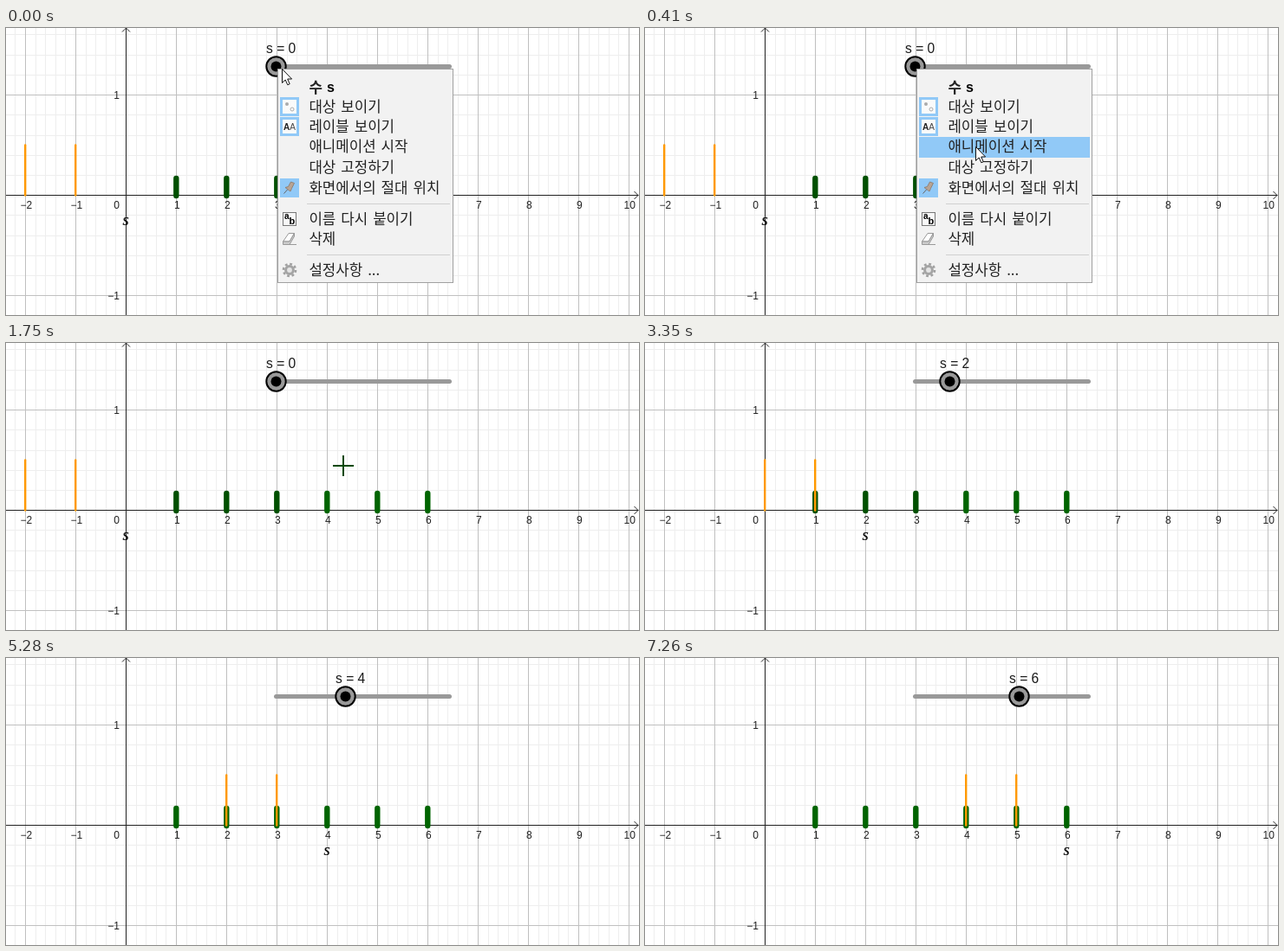
Recreate the animation shown at these times as an HTML page. Size 730 px wide and 332 px high, loop 8000 ms.

```html
<!DOCTYPE html>
<html lang="ko">
<head>
<meta charset="utf-8">
<title>Slider animation</title>
<style>
html, body { margin: 0; width: 100%; height: 100%; overflow: hidden; background: #fff; }
svg { display: block; }
text { font-family: "Liberation Sans", Arial, sans-serif; fill: #000; }
.tick { font-size: 12px; fill: #222; }
.name { font: italic 18.5px "Liberation Serif", serif; stroke: #000; stroke-width: .15; }
.value { font-size: 15.6px; fill: #1a1a1a; }
.item { font: 300 16.8px "Noto Sans CJK KR", "Noto Sans CJK", "Noto Sans KR", sans-serif; word-spacing: 1.3px; fill: #222; }
</style>
</head>
<body>
<svg id="stage" width="730" height="332" viewBox="0 0 730 332"></svg>
<script>
const NS = 'http://www.w3.org/2000/svg';
const stage = document.getElementById('stage');
const LOOP = 8000, OX = 138.5, OY = 193.6, UX = 58, UY = 116;

function add(parent, tag, attrs, text) {
  const el = document.createElementNS(NS, tag);
  for (const k in attrs) el.setAttribute(k, attrs[k]);
  if (text !== undefined) el.textContent = text;
  parent.appendChild(el);
  return el;
}
const group = (parent = stage) => add(parent, 'g', {});
const rect = (p, x, y, width, height, fill, more) => add(p, 'rect', { x, y, width, height, fill, ...more });
const path = (p, d, stroke, width = 1, more) =>
  add(p, 'path', { d, stroke, 'stroke-width': width, fill: 'none', ...more });
const label = (p, x, y, text, cls, more) => add(p, 'text', { x, y, class: cls, ...more }, text);
const move = (el, x, y) => el.setAttribute('transform', `translate(${x} ${y})`);
const show = (el, on) => el.setAttribute('visibility', on ? 'visible' : 'hidden');
const snap = v => Math.floor(v) + .5;
const xAt = k => snap(OX + UX * k);
const yAt = k => snap(OY - UY * k);
const signed = n => n < 0 ? '\u2212' + -n : n;

// Grid and axes
function drawGrid() {
  const grid = group();
  for (const major of [false, true]) {
    let d = '';
    for (let i = -12; i <= 50; i++)
      if ((i % 5 === 0) === major) d += `M${xAt(i / 5)} 0V332`;
    for (let i = -6; i <= 8; i++)
      if ((i % 5 === 0) === major) d += `M0 ${yAt(i / 5)}H730`;
    path(grid, d, major ? '#c0c0c0' : '#eee');
  }
  path(grid, `M0 ${yAt(0)}H729M${OX} 0V332`, '#222');
  path(grid, `M724.5 189L729 ${yAt(0)}L724.5 198M134 4.5L${OX} 0L143 4.5`, '#222');
  for (let k = -2; k <= 10; k++)
    if (k) label(grid, OX + UX * k + .8, 209, signed(k), 'tick', { 'text-anchor': 'middle' });
  label(grid, 131, 209, '0', 'tick', { 'text-anchor': 'end' });
  for (const k of [1, -1])
    label(grid, 131, yAt(k) + 4.5, signed(k), 'tick', { 'text-anchor': 'end' });
}
drawGrid();

const bars = [1, 2, 3, 4, 5, 6].map(k =>
  path(stage, `M${xAt(k) - .2} 174V194`, '#006400', 6.4, { 'stroke-linecap': 'round' }));

const pair = group();
for (const k of [-2, -1])
  path(pair, `M${xAt(k) - .3} 135.5V193.5`, '#ff9900', 2.4, { 'stroke-linecap': 'round' });
const varName = label(stage, 0, 228, 's', 'name', { 'text-anchor': 'middle' });

// Slider
path(stage, 'M311.5 44.5H511.5', '#999', 5, { 'stroke-linecap': 'round' });
const knob = group();
add(knob, 'circle', { cx: 311.5, cy: 44.5, r: 11.2, fill: '#999', stroke: '#000', 'stroke-width': 2 });
add(knob, 'circle', { cx: 311.5, cy: 44.5, r: 6, fill: '#000' });
const value = label(stage, 300, 29, '', 'value');

// Context menu
const menu = group();
rect(menu, 313.5, 47.5, 202, 247, '#f2f2f2', { stroke: '#a0a0a0' });
const hover = rect(menu, 316, 126, 197, 24, '#91c9f7');

function drawMenu() {
  const rows = [
    [97, '대상 보이기'], [120, '레이블 보이기'], [143, '애니메이션 시작'],
    [167, '대상 고정하기'], [191, '화면에서의 절대 위치'],
    [227, '이름 다시 붙이기'], [250, '삭제'], [286, '설정사항 ...']
  ];
  for (const [y, text] of rows) label(menu, 349.4, y, text, 'item');
  label(menu, 349.4, 75, '수', 'item', { style: 'font-weight:bold' });
  label(menu, 370, 74, 's', '', { 'font-size': 16, 'font-weight': 'bold' });
  path(menu, 'M347 203.5H512M347 262.5H512', '#d0d0d0');

  for (const y of [80, 103]) {
    rect(menu, 316, y, 22, 22, '#91c9f7');
    rect(menu, 319, y + 3, 16, 16, '#fafafa');
  }
  add(menu, 'circle', { cx: 324, cy: 88, r: 2, fill: '#aaa' });
  add(menu, 'circle', { cx: 330, cy: 94, r: 2, fill: '#fff', stroke: '#aaa' });
  label(menu, 320, 118, 'A', '', { 'font-size': 10, 'font-weight': 'bold', style: 'fill:#222' });
  label(menu, 327.3, 118, 'A', '', { 'font-size': 10, style: 'fill:#444' });

  rect(menu, 316, 174, 22, 22, '#91c9f7');
  path(menu, 'M320.5 191.5L324.5 187', '#666');
  path(menu, 'M322 184.5L328 189L329.5 185.5L332.5 179.5L328.5 178L325.5 183.5Z', '#8a7668', .8, { fill: '#b8a494' });

  rect(menu, 319.5, 213.5, 15, 15, '#f8f8f8', { stroke: '#777' });
  label(menu, 321, 221, 'a', '', { 'font-size': 10, 'font-weight': 'bold' });
  label(menu, 326.5, 227, 'b', '', { 'font-size': 11, 'font-weight': 'bold' });

  path(menu, 'M319.5 247L326 237.5H332.5L327 247Z', '#999', 1, { fill: '#fff' });
  path(menu, 'M319.5 247V250.5H327L332.5 241V237.5L327 247Z', '#999', 1, { fill: '#ccc' });
  path(menu, 'M327 250.5H335', '#999');

  add(menu, 'circle', { cx: 327, cy: 280, r: 7, fill: 'none', stroke: '#a0a0a0',
    'stroke-width': 2.6, 'stroke-dasharray': '2.8 2.7' });
  add(menu, 'circle', { cx: 327, cy: 280, r: 4.4, fill: '#e4e4e4', stroke: '#a4a4a4', 'stroke-width': 3 });
}
drawMenu();

// Pointers
const arrow = path(stage, 'M.5 .5V16.5L4.2 13L6.8 18.8L9.2 17.7L6.7 12H11.6Z', '#111', 1, { fill: '#fff' });
const cross = path(stage, 'M-12 0H12M0 -12V12', '#004800', 2);

// Pointer steps: time, x, y
const steps = [
  [0, 318, 47], [70, 321, 54], [140, 329, 68], [200, 340, 86], [270, 353, 104],
  [340, 368, 122], [410, 381, 137], [470, 387, 146], [540, 390, 153],
  [810, 390, 152], [880, 389, 150], [940, 388, 148], [1010, 388, 146],
  [1140, 388, 143], [1340, 388, 142], [1750, 389, 142],
  [1950, 394, 162], [2020, 408, 218], [2090, 425, 286]
];
const menuRows = [79, 103, 126, 150, 174];
const ticks = [2360, 3350, 4290, 5280, 6270, 7260];
const CLOSE = 1550, CROSS = 1750, LEAVE = 2160;

function draw(t) {
  const s = ticks.filter(v => v <= t).length;
  move(pair, UX * s, 0);
  move(varName, OX + UX * s - .5, 0);
  move(knob, 20 * s, 0);
  move(value, 20 * s, 0);
  value.textContent = 's = ' + s;
  bars.forEach((bar, i) => bar.setAttribute('stroke', i < 3 && s < 3 ? '#005000' : '#006400'));

  const [, x, y] = steps.filter(p => p[0] <= t).pop();
  move(arrow, x, y);
  move(cross, x, y);
  show(arrow, t < CROSS);
  show(cross, t >= CROSS && t < LEAVE);

  const open = t < CLOSE;
  const row = menuRows.filter(top => top <= y).pop();
  show(menu, open);
  show(hover, open && row !== undefined);
  if (row !== undefined) hover.setAttribute('y', row);
}

const start = performance.now();
function frame(now) {
  draw(Math.max(0, now - start) % LOOP);
  requestAnimationFrame(frame);
}
draw(0);
requestAnimationFrame(frame);
</script>
</body>
</html>
```
